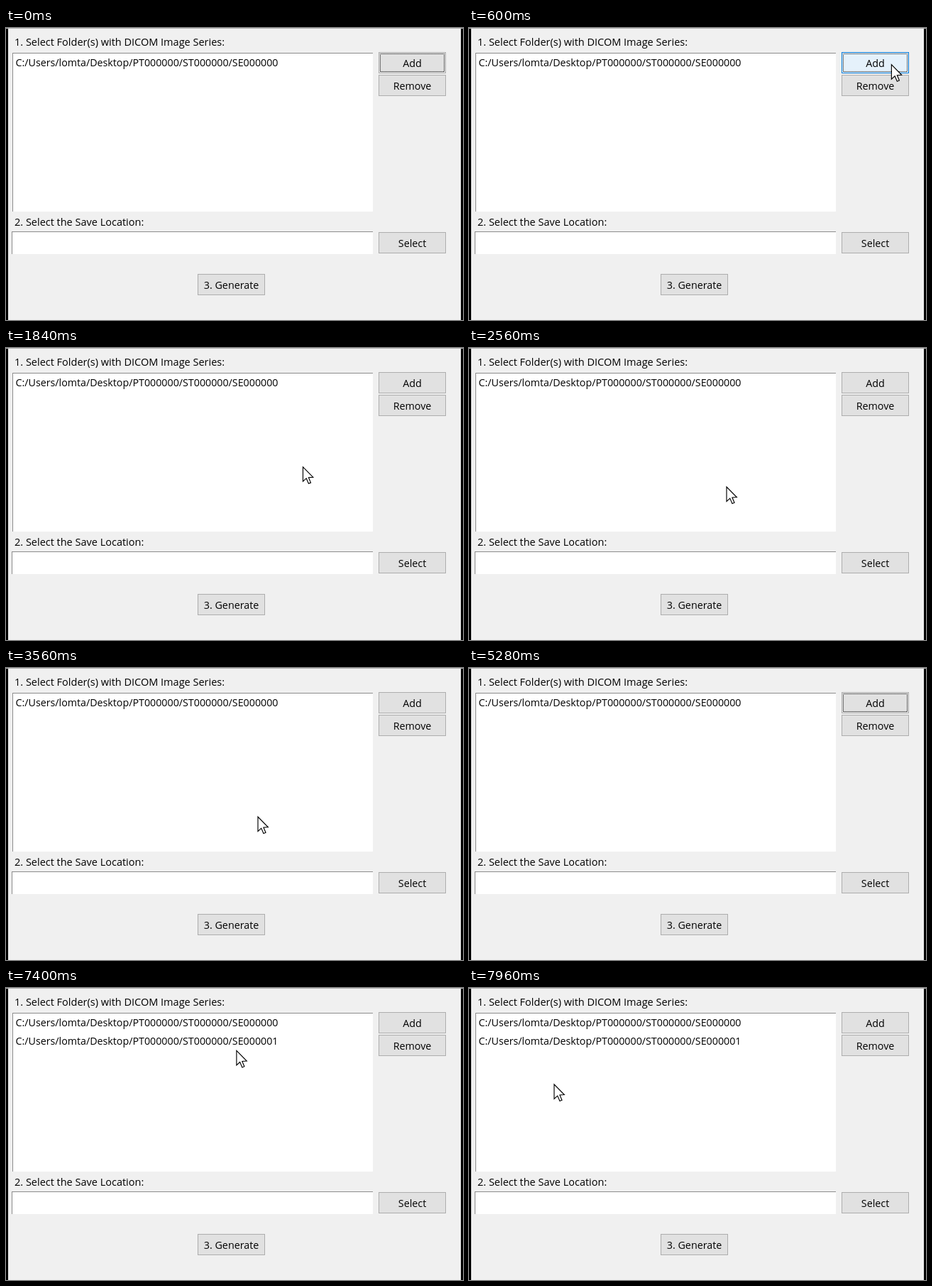
An HTML page with a canvas for the animation above (8000 ms loop, 644x412 px).

```html
<!DOCTYPE html>
<html lang="en">
<head>
<meta charset="utf-8">
<title>DICOM folder selection</title>
<style>
  html, body { margin: 0; width: 100%; height: 100%; overflow: hidden; background: #f0f0f0; }
  canvas { display: block; }
</style>
</head>
<body>
<canvas id="stage" width="644" height="412"></canvas>
<script>
const ctx = document.getElementById('stage').getContext('2d');
const LOOP = 8000, STEP = 40, TAU = Math.PI * 2;
const SIDE = 525, BUTTON_W = 95, BUTTON_H = 30;
const FOLDER = 'C:/Users/lomta/Desktop/PT000000/ST000000/SE00000';
const ARROW = new Path2D('M0 0V16l3.7-3.4 2.5 5.8 2.4-1-2.4-5.7 5-.3z');

const within = (t, from, to) => t >= from && t < to;
const easeOut = k => 1 - (1 - k) ** 2;

function pointerAt(t) {
  let x = 660, y = 46;
  // Each glide starts where the previous one ended; bow lifts it into an arc.
  function glide(from, to, endX, endY, bow = 0) {
    if (t < from) return;
    const k = easeOut(Math.min(1, (t - from) / (to - from)));
    x += (endX - x) * k;
    y += (endY - y) * k - bow * Math.sin(Math.PI * k);
  }
  glide(40, 760, 592, 52);
  glide(880, 1160, 601, 75);
  glide(1240, 2400, 363, 196);
  glide(3000, 3560, 355, 210);
  glide(4240, 4440, 660, 300);
  glide(6240, 6800, 581, 306);
  glide(7120, 7960, 120, 136, 125);
  return [x, y];
}

function rect(x, y, w, h, color) {
  ctx.fillStyle = color;
  ctx.fillRect(x, y, w, h);
}

function text(str, x, y, size = 14.5, align = 'left') {
  ctx.font = `${size}px "Open Sans", "Noto Sans", sans-serif`;
  ctx.textAlign = align;
  ctx.fillStyle = '#000';
  ctx.fillText(str, x, y);
}

function field(x, y, w, h) {
  rect(x, y, w, h, '#8c8c8c');
  rect(x + 1, y + 1, w - 1, h - 1, '#fff');
}

const STYLES = {
  normal: ['#e1e1e1', '#adadad'],
  hover: ['#e5f1fb', '#0078d7'],
  pressed: ['#cce4f7', '#005499']
};

function button(label, x, y, state = 'normal', focused = false) {
  const [fill, border] = STYLES[state];
  rect(x, y, BUTTON_W, BUTTON_H, border);
  rect(x + 1, y + 1, BUTTON_W - 2, BUTTON_H - 2, fill);
  if (focused) {
    ctx.lineWidth = 1;
    ctx.strokeStyle = '#000';
    ctx.setLineDash([1, 1]);
    ctx.lineDashOffset = .5;
    ctx.strokeRect(x + 2.5, y + 2.5, BUTTON_W - 5, BUTTON_H - 5);
    ctx.setLineDash([]);
  }
  text(label, x + BUTTON_W / 2, y + 20.5, 14.3, 'center');
}

function arrow(x, y) {
  ctx.save();
  ctx.translate(x, y);
  ctx.scale(1.28, 1.28);
  ctx.fillStyle = '#fff';
  ctx.fill(ARROW);
  ctx.lineWidth = .9;
  ctx.strokeStyle = '#000';
  ctx.stroke(ARROW);
  ctx.restore();
}

function busyRing(x, y, t) {
  const turn = Math.PI + (t - 1160) / 1000 * TAU;
  function ring(from, to, color) {
    ctx.beginPath();
    ctx.arc(x, y, 9, from, to);
    ctx.strokeStyle = color;
    ctx.stroke();
  }
  rect(x - 5, y - 5, 10, 10, '#fff');
  ctx.lineWidth = 6;
  ring(0, TAU, '#3595e4');
  ring(turn - .8, turn + .8, '#73d0f5');
}

function draw(t) {
  const [x, y] = pointerAt(t);
  const dialogOpen = within(t, 1280, 5280) || t >= 7160;
  const busy = within(t, 960, 1280) || within(t, 7040, 7160);

  function stateOf(top, click) {
    if (within(t, click, click + 80)) return 'pressed';
    const over = within(x, SIDE, SIDE + BUTTON_W) && within(y, top, top + BUTTON_H);
    const waiting = busy && within(t, click, click + 400);
    return waiting || (over && !busy && !dialogOpen) ? 'hover' : 'normal';
  }

  rect(0, 0, 644, 412, '#000');
  rect(3, 0, 638, 412, '#f0f0f0');
  rect(0, 0, 644, 1, '#b4b4b4');

  text('1. Select Folder(s) with DICOM Image Series:', 12, 25);
  field(9, 35, 508, 224);
  text(FOLDER + '0', 13.5, 53.5, 14.26);
  if (t >= 5640) text(FOLDER + '1', 13.5, 79.5, 14.26);

  text('2. Select the Save Location:', 12, 279);
  field(8, 287, 509, 32);

  const addFocused = t < 880 || within(t, 5280, 6960);
  button('Add', SIDE, 34, stateOf(34, 880), addFocused);
  button('Remove', SIDE, 66, stateOf(66));
  button('Select', SIDE, 288, stateOf(288, 6960));
  button('3. Generate', 270, 347);

  if (busy) busyRing(x, y, t);
  else arrow(x, y);
}

const start = performance.now();
function tick() {
  const t = (performance.now() - start) % LOOP;
  draw(Math.floor(t / STEP) * STEP);
  requestAnimationFrame(tick);
}
tick();
</script>
</body>
</html>
```
